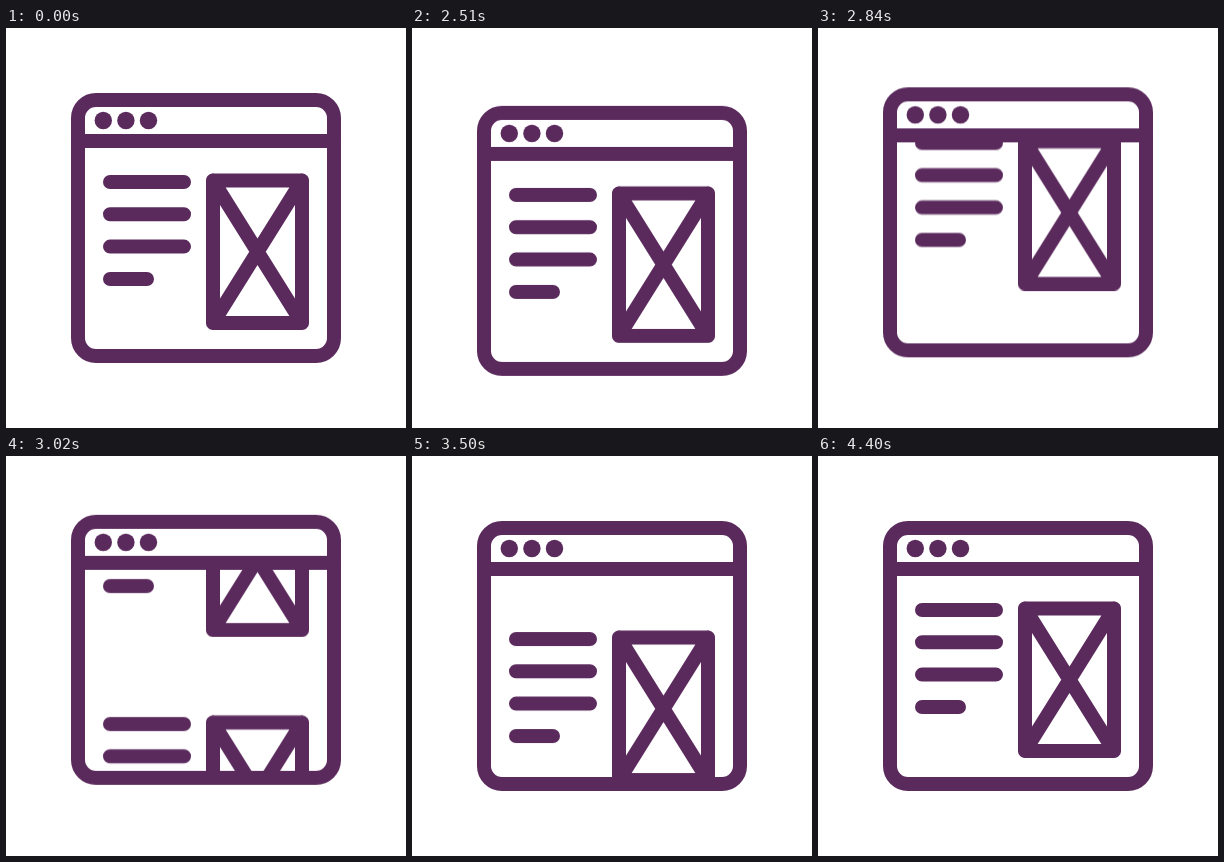
These frames come from a looping animation (400 px wide and 400 px high, 4460 ms). An HTML page:

```html
<!DOCTYPE html>
<html lang="en">
<head>
<meta charset="utf-8">
<title>Scrolling page icon</title>
<style>
  html, body { margin: 0; width: 100%; height: 100%; overflow: hidden; background: #fff; }
  svg { display: block; width: 100%; height: 100%; }

  .window {
    --ink: #5b2a5d;
    fill: none;
    stroke: var(--ink);
    stroke-width: 14;
    stroke-linecap: round;
    stroke-linejoin: round;
    animation: bounce 4460ms infinite;
  }
  .dots { fill: var(--ink); stroke: none; }
  .page { animation: scroll 4460ms linear infinite; }

  /* Dip, spring up, settle */
  @keyframes bounce {
    0%, 44.84% { transform: translateY(0); animation-timing-function: cubic-bezier(.37, 0, .63, 1); }
    56.5% { transform: translateY(12.9px); animation-timing-function: cubic-bezier(.37, 0, .63, 1); }
    65.02% { transform: translateY(-6.8px); animation-timing-function: cubic-bezier(.37, 0, .63, 1); }
    78.48%, 100% { transform: translateY(0); }
  }

  /* One page height, so the second copy lands where the first began */
  @keyframes scroll {
    0%, 56.5% { transform: translateY(0); animation-timing-function: cubic-bezier(.377, 0, .01, 1); }
    98.65%, 100% { transform: translateY(-235px); }
  }
</style>
</head>
<body>
<svg viewBox="0 0 400 400" aria-hidden="true">
  <defs>
    <clipPath id="view"><rect x="72" y="113" width="256" height="215"/></clipPath>
    <g id="content">
      <path d="M104 154H178M104 186.3H178M104 218.6H178M104 251H141"/>
      <path d="M207 152.5H296V295H207ZL296 295M296 152.5L207 295"/>
    </g>
  </defs>
  <g class="window">
    <g clip-path="url(#view)">
      <g class="page">
        <use href="#content"/>
        <use href="#content" y="235"/>
      </g>
    </g>
    <rect x="72" y="72" width="256" height="256" rx="18"/>
    <path d="M72 113H328"/>
    <g class="dots">
      <circle cx="97.3" cy="92.5" r="8.7"/>
      <circle cx="119.9" cy="92.5" r="8.7"/>
      <circle cx="142.5" cy="92.5" r="8.7"/>
    </g>
  </g>
</svg>
</body>
</html>
```
